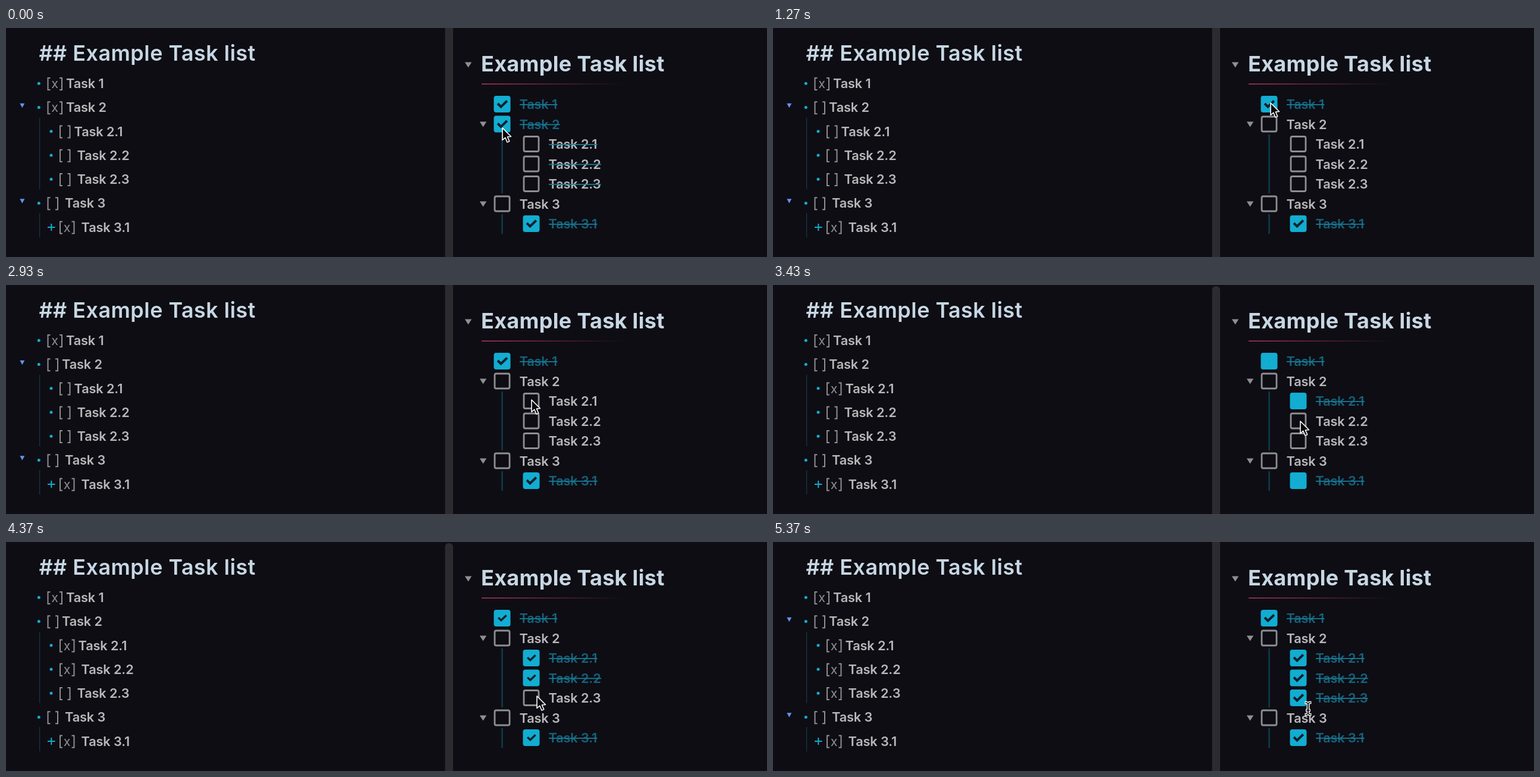
Write an HTML page with a canvas that moves like this. It is 1280 px wide and 385 px high and loops after 5410 ms.

```html
<!DOCTYPE html>
<html lang="en">
<head>
<meta charset="utf-8">
<title>Example Task list</title>
<style>
  html, body { margin: 0; height: 100%; overflow: hidden; background: #0e0d14; }
  canvas { display: block; }
</style>
</head>
<body>
<canvas id="stage" width="1280" height="385"></canvas>
<script>
const ctx = document.getElementById('stage').getContext('2d');
const LOOP = 5410, TRAVEL = 300, LAG = 110, HIDE = 500, FILL = 360, TICK = 160;
const BG = '#0e0d14', BLUE = '#12add1', GREY = '#8f8f92', TEXT = '#b8b8ba',
      DIM = '#15627a', STRIKE = '#137f9b', GUIDE = '#0f3b49', TITLE = '#c7d7e3';

const names = ['Task 1', 'Task 2', 'Task 2.1', 'Task 2.2', 'Task 2.3', 'Task 3', 'Task 3.1'];
const tasks = names.map((name, i) => ({
  name,
  nested: name.includes('.'),
  checked: [0, 1, 6].includes(i)
}));

// where the pointer rests, when it leaves, and the task it toggles then
const stops = [
  { x: 835, y: 168, leave: 220, task: 1 },
  { x: 837, y: 126, leave: 1340, task: 0 },
  { x: 837, y: 126, leave: 2195, task: 0 },
  { x: 884, y: 193, leave: 2970, task: 2 },
  { x: 887, y: 229, leave: 3780, task: 3 },
  { x: 893, y: 259, leave: 4340, task: 4 },
  { x: 893, y: 259, leave: 4800 },
  { x: 904, y: 328, leave: 5070 },
  { x: 900, y: 280 }
];

const clamp = v => Math.max(0, Math.min(1, v));
const smooth = u => u * u * (3 - 2 * u);

function text(str, x, y, size, weight, color, spacing = 0) {
  ctx.font = `${weight} ${size}px Inter, "Open Sans", sans-serif`;
  ctx.letterSpacing = spacing + 'px';
  ctx.fillStyle = color;
  ctx.fillText(str, x, y);
  return ctx.measureText(str).width;
}

const label = (str, x, y, color) => text(str, x, y + 8, 21.8, 600, color, -0.15);

function rect(x, y, w, h, color, r = 0) {
  ctx.fillStyle = color;
  ctx.beginPath();
  ctx.roundRect(x, y, w, h, r);
  ctx.fill();
}

function poly(points, color) {
  ctx.fillStyle = color;
  ctx.beginPath();
  points.forEach(p => ctx.lineTo(...p));
  ctx.closePath();
  ctx.fill();
}

function line(points, color, width) {
  ctx.strokeStyle = color;
  ctx.lineWidth = width;
  ctx.beginPath();
  points.forEach(p => ctx.lineTo(...p));
  ctx.stroke();
}

const arrow = (x, y, w, h, color) =>
  poly([[x - w / 2, y - h / 2], [x + w / 2, y - h / 2], [x, y + h / 2]], color);

function editorRow({ name, nested }, i, on) {
  const y = 93 + i * 40.25, left = nested ? 90 : 69.5, right = left + (on ? 25.5 : 18.5);
  const mark = nested ? 76 : 55.3;
  if (i === 6) {
    rect(mark - 6, y - 0.5, 12.5, 2, BLUE);
    rect(mark - 0.7, y - 5.5, 2, 12, BLUE);
  } else {
    rect(mark - 2.5, y - 2.2, 5, 5, BLUE, 2.5);
  }
  for (const [x, dir] of [[left, 1], [right, -1]]) {
    const inner = x + 5 * dir, outer = x + dir;
    line([[inner, y - 9], [outer, y - 9], [outer, y + 11], [inner, y + 11]], GREY, 2);
  }
  if (on) text('x', left + 6.7, y + 8, 21.5, 400, GREY);
  // later items have an extra space after the brackets
  label(name, right + (i > 2 ? 11 : 6), y, TEXT);
}

function checkbox(x, y, on, age) {
  if (!on) {
    ctx.strokeStyle = GREY;
    ctx.lineWidth = 2.8;
    ctx.beginPath();
    ctx.roundRect(x - 12.5, y - 12.5, 25, 25, 2.5);
    ctx.stroke();
    return;
  }
  rect(x - 14, y - 14, 28, 28, BLUE, 4);
  const hole = 11 * (1 - clamp(age / FILL));
  rect(x - hole, y - hole, hole * 2, hole * 2, BG, Math.min(2, hole / 3));
  const s = smooth(clamp((age - FILL) / TICK));
  line([[-7.5, -1], [-2, 4.4], [8.3, -5.5]].map(([a, b]) => [x + a * s, y + b * s]), '#10202a', 4 * s || 0.01);
}

function previewRow({ name, nested }, i, on, struck, age) {
  const y = 128 + i * 33.5, x = nested ? 883.5 : 834.5;
  checkbox(x, y, on, age);
  const w = label(name, x + 29, y, on ? DIM : TEXT);
  if (on || struck) rect(x + 29.5, y, w, 1.8, STRIKE);
}

function arrowCursor() {
  const shape = [[0, 0], [0, 20.5], [4.7, 16.3], [8, 24], [11.7, 22.4], [8.4, 15], [14.5, 14.5]];
  poly(shape, '#08080b');
  line([...shape, shape[0], shape[1]], '#fff', 1.6);
}

function textCursor() {
  for (const [color, width, grow] of [['#fff', 4.5, 1], ['#111', 1.6, 0]]) {
    for (const side of [-1, 1]) {
      const end = side * (4.5 + grow), bend = side * 2;
      line([[end, -10], [bend, -10], [0, -8], [0, 8], [bend, 10], [end, 10]], color, width);
    }
    line([[-3 - grow, 3], [3 + grow, 3]], color, width);
  }
}

function pointer(t) {
  let { x, y } = stops[0];
  for (let i = 1; i < stops.length; i++) {
    const u = smooth(clamp((t - stops[i - 1].leave) / TRAVEL));
    x += (stops[i].x - x) * u;
    y += (stops[i].y - y) * u;
  }
  ctx.save();
  ctx.translate(x, y);
  ctx.lineJoin = 'round';
  if (t < 4900) arrowCursor(); else textCursor();
  ctx.restore();
}

function draw(t) {
  const state = tasks.map(task => task.checked);
  let age = Infinity;
  for (const { leave, task } of stops) {
    if (task === undefined || t < leave + LAG) continue;
    state[task] = !state[task];
    age = t - leave - LAG;
  }
  const busy = age < HIDE;

  rect(0, 0, 1280, 385, BG);
  rect(738.5, busy ? 2 : 0, 13.5, 400, '#2d2a30', busy ? 6 : 0);

  // editor pane
  text('## Example Task list', 55.5, 54.5, 36, 600, TITLE, 0.45);
  rect(56, 151, 1.2, 120, GUIDE);
  rect(56, 311, 1.2, 41, GUIDE);
  if (!busy) for (const y of [130.5, 291]) arrow(27.3, y, 8, 7.5, '#6790ef');
  tasks.forEach((task, i) => editorRow(task, i, state[i]));

  // preview pane
  arrow(777.5, 62, 11.5, 9, GREY);
  text('Example Task list', 799, 73, 36, 700, TITLE, 0.3);
  const fade = ctx.createLinearGradient(800, 0, 1040, 0);
  fade.addColorStop(0, '#b8385f');
  fade.addColorStop(1, BG);
  rect(800, 93.5, 240, 1.5, fade);
  rect(833.2, 179, 2.6, 99, GUIDE);
  rect(833.2, 313, 2.6, 33, GUIDE);
  for (const y of [162, 296]) arrow(802.5, y, 11.5, 9, GREY);
  tasks.forEach((task, i) => {
    const struck = state[1] && task.name.startsWith('Task 2');
    previewRow(task, i, state[i], struck, age);
  });

  pointer(t);
}

function frame() {
  draw(performance.now() % LOOP);
  requestAnimationFrame(frame);
}
frame();
</script>
</body>
</html>
```
